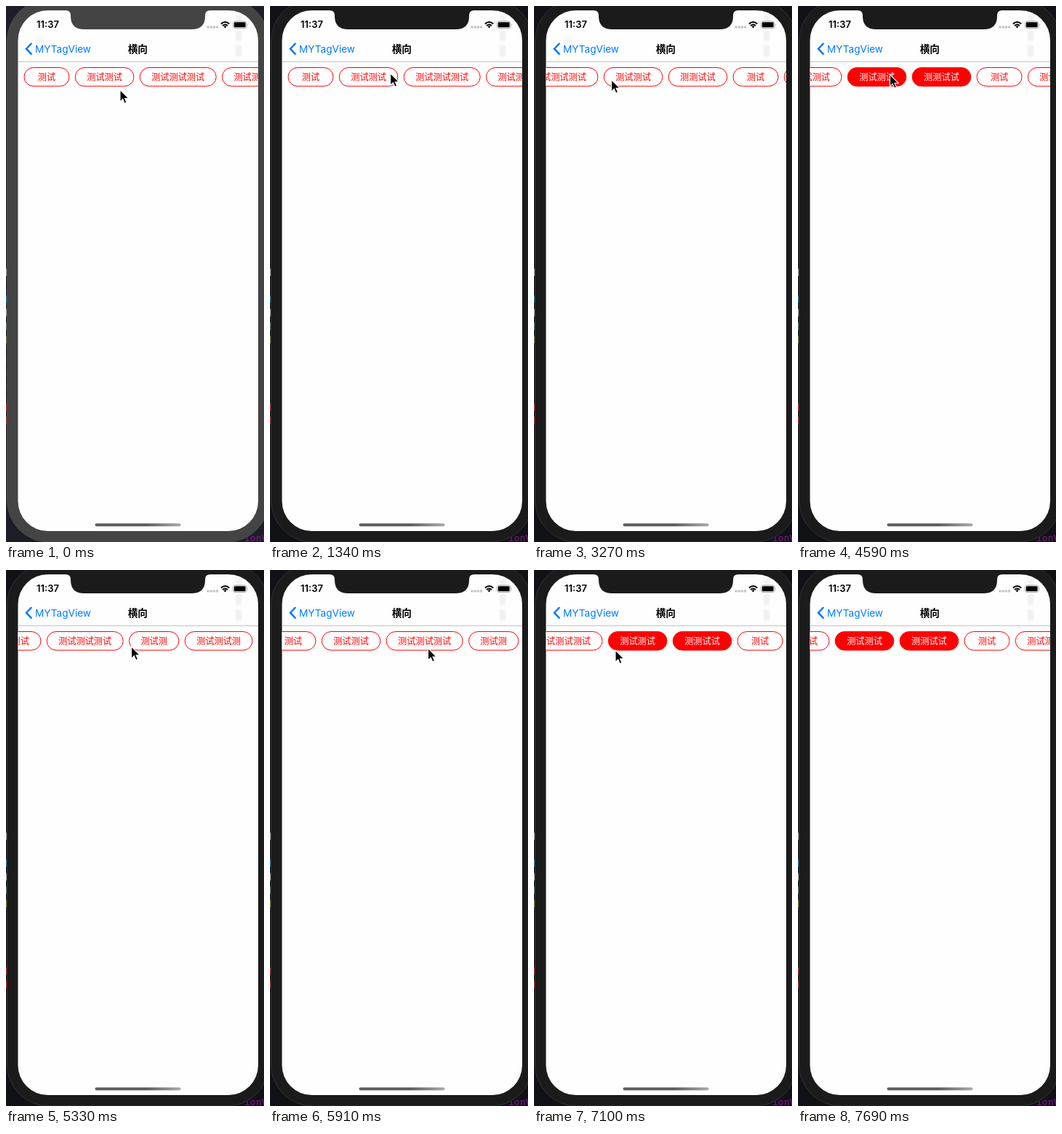
An HTML page for the animation above (7.79 s loop, 355 by 735 pixels).

```html
<!DOCTYPE html>
<html lang="zh-CN">
<head>
<meta charset="utf-8">
<style>
  html, body { margin: 0; width: 100%; height: 100%; overflow: hidden; background: #15151b; }
  svg { display: block; width: 355px; height: 735px; }
  text { font-family: Inter, "Noto Sans CJK SC", "Noto Sans CJK", sans-serif; }
  #tags text { font-size: 12.2px; text-anchor: middle; fill: #f00; }
  #tags rect { fill: #fff; stroke: #f00; }
  #tags .on rect { fill: #f00; }
  #tags .on text { fill: #fff; }
  .nav { font-size: 13.6px; }
</style>
</head>
<body>
<svg viewBox="0 0 355 735">
  <defs>
    <clipPath id="screen"><rect x="16.5" y="6" width="330.5" height="714" rx="41"/></clipPath>
    <linearGradient id="homeFill">
      <stop offset=".6" stop-color="#5c5c5c"/><stop offset="1" stop-color="#aaa"/>
    </linearGradient>
    <filter id="soft" x="-1" width="3"><feGaussianBlur stdDeviation="1.6"/></filter>
  </defs>

  <rect id="desk" width="355" height="735"/>
  <g id="code"></g>
  <text x="328" y="734" font-size="13" fill="#86168f" style="font-family:'DejaVu Sans Mono',monospace">ionV</text>

  <rect id="bezel" x="1.5" y="-9" width="360" height="744" rx="57"/>
  <g clip-path="url(#screen)">
    <rect width="355" height="735" fill="#fefefe"/>
    <path d="M320 12V72" stroke="#f1f1f1" stroke-width="8" stroke-dasharray="15 6" filter="url(#soft)" style="filter:blur(1.6px)"/>
    <path d="M16 76.5H348" stroke="#c4c4c4"/>
    <g id="tags"></g>
  </g>
  <path id="notch" d="M82 5v1q7 0 7 7v1q0 18 19 18h147q19 0 19-18v-1q0-7 7-7v-1z"/>

  <text x="42" y="30.3" font-size="13" font-weight="600">11:37</text>
  <path d="M278 29H291" stroke="#c2c2c2" stroke-width="3.6" stroke-linecap="round" stroke-dasharray="0 4.2"/>
  <path d="M295.8 24.6q5.7-5.2 11.4 0M298 27.1q3.5-3.1 7 0" fill="none" stroke="#000" stroke-width="2"/>
  <path d="M299.4 28l2.1 2.6 2.1-2.6q-2.1-1.4-4.2 0"/>
  <rect x="312.5" y="21" width="18.4" height="9.6" rx="2.6" fill="none" stroke="#aaa"/>
  <rect x="313.8" y="22.3" width="15.8" height="7" rx="1.4"/>
  <path d="M332 24.2q1.6 1.6 0 3.2z" fill="#999"/>

  <path d="M35.3 51l-7.3 7.7 7.3 7.7" fill="none" stroke="#007aff" stroke-width="2.5"/>
  <text class="nav" x="40" y="63.5" fill="#007aff">MYTagView</text>
  <text class="nav" x="181.3" y="63.5" font-weight="700" text-anchor="middle">横向</text>

  <rect x="122.5" y="709.5" width="118" height="4" rx="2" fill="url(#homeFill)"/>
  <path id="cursor" d="M0 0v16.3l3.7-3.5 2.5 5.6 2.8-1.2-2.5-5.5h5.1z" stroke="#fff" stroke-width="1.1"/>
</svg>

<script>
const LOOP = 7790, STEP = 147.9;
const SVG = "http://www.w3.org/2000/svg";
const $ = id => document.getElementById(id);

function add(parent, name, attrs = {}) {
  const el = document.createElementNS(SVG, name);
  for (const key in attrs) el.setAttribute(key, attrs[key]);
  return parent.appendChild(el);
}

// slivers of an editor window behind the phone
"#999 #111 #0a7590 #999 #4d6657 #707038 #111 #111 #111 #111 #a22 #a22".split(" ")
  .forEach((fill, i) => add($("code"), "rect", { x: 0, y: 360 + i * 18.5, width: 1.5, height: 10, fill }));

const labels = ["测试", "测试测试", "测试测试测试", "测试测试测试测试", "测试测试", "测测试试", "测试",
  "测试测试", "测试测试测试", "测试测", "测试测试测", "测试测试"];
let left = 25;
const tags = labels.map(label => {
  const width = Math.max(62, label.length * 12.2 + 31.8);
  const tag = add($("tags"), "g");
  add(tag, "rect", { x: left, y: 84.5, width, height: 25.5, rx: 12.75 });
  add(tag, "text", { x: left + width / 2, y: 101.8 }).textContent = label;
  left += width + 8.3;
  return tag;
});

// step, x, y
const cursorPath = [
  [3, 157, 115], [5, 180, 89], [7, 178, 90], [14, 135, 98], [15, 138.5, 98.5], [16, 138.5, 98.5],
  [19, 75, 100], [22, 106.5, 101], [24, 118, 106], [26, 226, 108], [29, 128, 95], [31, 126.5, 94],
  [33, 70, 100], [36, 172.5, 105], [38, 172.5, 106], [41, 240, 108], [44, 153, 110],
  [46, 153, 110], [48, 112, 110], [52, 190, 760]
];
// first step, scroll offset reached six steps later
const swipes = [[16, 339], [30, 716], [38, 315], [46, 384]];

function cursorAt(step) {
  const i = cursorPath.findIndex(p => p[0] >= step);
  if (i <= 0) return cursorPath[0];
  const a = cursorPath[i - 1], b = cursorPath[i], f = (step - a[0]) / (b[0] - a[0]);
  return a.map((v, j) => v + (b[j] - v) * f);
}

function scrollAt(step) {
  return swipes.reduce((from, [first, to]) => {
    const f = Math.min(1, Math.max(0, (step - first) / 6));
    return from + (to - from) * f * f * (3 - 2 * f);
  }, 0);
}

function draw() {
  const time = (performance.now() - start) % LOOP;
  const step = Math.floor((time + 8) / STEP);
  const [, x, y] = cursorAt(step);
  const active = step >= 7;
  const body = active ? "#1b1b1b" : "#444";
  $("desk").setAttribute("fill", active ? "#111118" : "#1d1d27");
  $("bezel").setAttribute("fill", body);
  $("bezel").setAttribute("stroke", active ? "#303034" : "#4a4a4a");
  $("notch").setAttribute("fill", body);
  $("tags").setAttribute("transform", `translate(${-scrollAt(step)})`);
  tags[4].classList.toggle("on", step >= 29);
  tags[5].classList.toggle("on", step >= 27);
  $("cursor").setAttribute("transform", `translate(${x} ${y})`);
  requestAnimationFrame(draw);
}
const start = performance.now();
draw();
</script>
</body>
</html>
```
